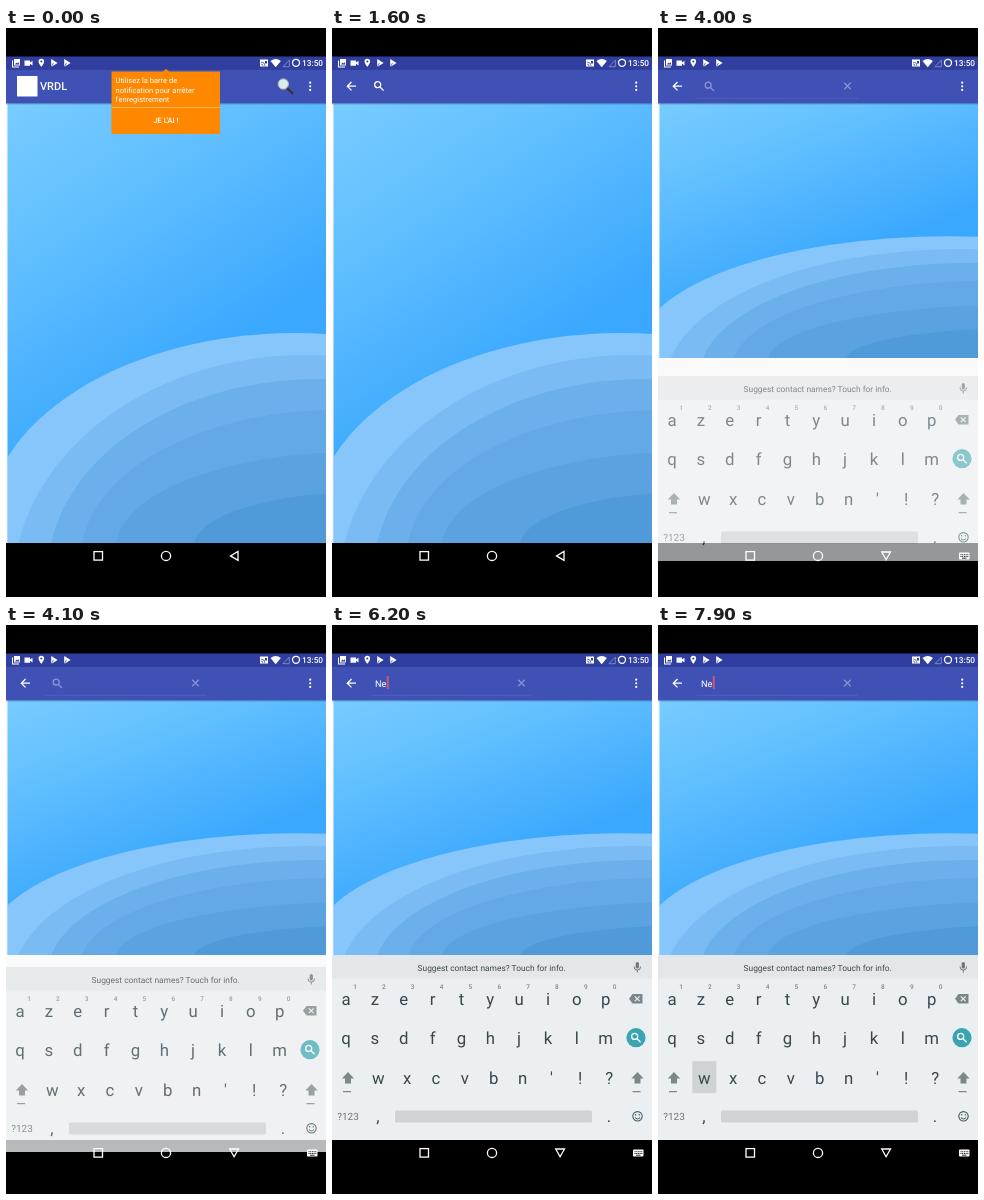
An HTML page for the animation above (8000 ms loop, 320 by 569 pixels).

```html
<!DOCTYPE html>
<html lang="fr">
<head>
<meta charset="utf-8">
<title>Recherche</title>
<style>
  html, body { margin: 0; width: 100%; height: 100%; overflow: hidden; background: #000; }
  svg { display: block; }
  #stage { width: 100%; height: 100%; font-family: Roboto, sans-serif; text-rendering: geometricPrecision; }
  .line { fill: none; stroke: #fff; stroke-width: 1.3; }
  .key { font-size: 16.8px; fill: #37474f; text-anchor: middle; }
  .num { font-size: 6.5px; font-weight: 500; fill: #7c878c; text-anchor: middle; }
</style>
</head>
<body>
<svg id="stage" viewBox="0 0 320 569">
  <defs>
    <linearGradient id="sky" gradientUnits="userSpaceOnUse" x1="0" y1="75" x2="181" y2="349">
      <stop offset="0" stop-color="#78ccff"/>
      <stop offset=".45" stop-color="#60beff"/>
      <stop offset="1" stop-color="#3aa8fe"/>
    </linearGradient>
    <linearGradient id="shade" x2="0" y2="1">
      <stop stop-color="#000" stop-opacity=".25"/>
      <stop offset="1" stop-color="#000" stop-opacity="0"/>
    </linearGradient>
    <g id="mag" fill="none" stroke-width="1.3">
      <circle cx="-1.3" cy="-1.3" r="3"/>
      <path d="M1 1L4.6 4.6"/>
    </g>
    <path id="shiftKey" d="M0-6L6.2 .5H3V5.5H-3V.5H-6.2Z"/>
    <g id="play"><path d="M-2.8-4L3.6 0L-2.8 4Z"/><path d="M-2.8 4L-.5 0" stroke="#303f9f" stroke-width=".7"/></g>
  </defs>

  <rect width="320" height="569"/>
  <rect y="75" width="320" height="440" fill="#fafafa"/>
  <svg id="wall" y="75" width="320" height="440" viewBox="0 75 320 440" preserveAspectRatio="none">
    <rect x="1.3" y="75" width="319" height="440" fill="url(#sky)"/>
    <g id="hills"></g>
    <rect y="75" width="1.3" height="440" fill="#f4f8fb"/>
  </svg>
  <rect y="75" width="320" height="2.5" fill="url(#shade)"/>

  <rect y="28.5" width="320" height="13" fill="#303f9f"/>
  <rect y="41.3" width="320" height="34" fill="#3f51b5"/>
  <g fill="#fff">
    <path d="M6 32.5h1v6h6v1H6ZM8 31h6v6.5H8Z"/>
    <path d="M9 36.5l1.5-2 1 1 1-1.3 1 2.3Z" fill="#303f9f"/>
    <path d="M18.5 32.5h5.5v2l2.500-1.7v4.6l-2.500-1.7v2h-5.5Z"/>
    <path d="M35.3 30.8a2.8 2.8 0 0 1 2.8 2.8c0 2-2.8 5.4-2.8 5.4s-2.8-3.400-2.8-5.400a2.8 2.8 0 0 1 2.8-2.8Z"/>
    <circle cx="35.3" cy="33.6" r="1" fill="#303f9f"/>
    <use href="#play" x="48" y="35"/>
    <use href="#play" x="61" y="35"/>
    <rect x="254" y="31.5" width="8" height="7"/>
    <path d="M255 36q2 0 2 2M255 34q4 0 4 4" stroke="#303f9f" stroke-width=".7" fill="none"/>
    <rect x="259" y="33" width="2" height="2.5" fill="#303f9f"/>
    <path d="M264.5 33q5.2-3.8 10.4 0l-5.2 6.3Z"/>
    <path d="M277 38.7h6.3v-6.6Z" fill="none" stroke="#8f98cf" stroke-width=".8"/>
    <circle cx="290" cy="34.8" r="3.5" class="line"/>
    <text x="296" y="38" font-size="8.3" font-weight="500">13:50</text>
    <circle cx="304.2" cy="54.7" r="1.1"/>
    <circle cx="304.2" cy="58.3" r="1.1"/>
    <circle cx="304.2" cy="61.9" r="1.1"/>
  </g>

  <g id="home">
    <rect x="11" y="48" width="20.5" height="20.5" fill="#fff"/>
    <text x="34" y="62.3" font-size="11" font-weight="500" fill="#fff">VRDL</text>
    <path d="M281 60L286.5 65.2" stroke="#37343a" stroke-width="2.4" stroke-linecap="round"/>
    <circle cx="277.3" cy="56" r="5.2" fill="#dcebe9" stroke="#a5b0ae"/>
  </g>
  <g id="search">
    <path class="line" d="M24 58.2H15.5M19.5 54L15.3 58.2L19.5 62.4"/>
    <use id="open" href="#mag" x="47" y="58" stroke="#fff"/>
    <g id="field">
      <path id="rule" d="M39 70.3H200" stroke="#fff"/>
      <use id="hint" href="#mag" x="51.5" y="58.5" stroke="#fff" opacity=".4"/>
      <path id="clear" class="line" d="M186.2 54.8l6.5 6.5m0-6.5l-6.5 6.5"/>
      <text id="query" x="43" y="61.5" font-size="9.2" fill="#fff"></text>
      <rect id="caret" y="51" width="2" height="13" fill="#c9567c"/>
    </g>
  </g>

  <g id="tip">
    <path d="M105.5 43.5H157L160 41L163 43.5H214V106H105.5Z" fill="#ff8800"/>
    <path d="M106 79.5H214" stroke="#ffc070" stroke-width=".8"/>
    <g fill="#fff" font-size="7.55">
      <text x="109.5" y="55.3">Utilisez la barre de</text>
      <text x="109.5" y="64.7">notification pour arrêter</text>
      <text x="109.5" y="74">l'enregistrement</text>
      <text x="160" y="95.3" font-weight="500" text-anchor="middle">JE L'AI !</text>
    </g>
  </g>

  <g id="board">
    <rect y="330" width="320" height="185" fill="#eceff1"/>
    <rect y="330" width="320" height="23.5" fill="#e4e7e9"/>
    <text x="159.7" y="346" font-size="8.4" fill="#37474f" text-anchor="middle">Suggest contact names? Touch for info.</text>
    <g fill="none" stroke="#6b777c">
      <path d="M305.3 338.5v3.5" stroke-width="3.2" stroke-linecap="round"/>
      <path d="M302 341.5a3.3 3.6 0 0 0 6.6 0M305.3 345v2.5"/>
    </g>
    <rect id="press" height="32" fill="#cfd3d6"/>
    <g id="keys"></g>
    <path d="M297 373.7l3.5-4.8h10v9.6h-10Z" fill="#7c878c"/>
    <path d="M302.8 371.3l4.8 4.8m0-4.8l-4.8 4.8" stroke="#eceff1" stroke-width="1.2"/>
    <g id="go">
      <circle cx="304" cy="412.7" r="9.6" fill="#3aa5b0"/>
      <use href="#mag" x="304" y="412.7" stroke="#fff"/>
    </g>
    <g id="shifts">
      <use href="#shiftKey" x="16" y="453"/>
      <use href="#shiftKey" x="305.5" y="453"/>
    </g>
    <path d="M11 466.7h8M300.5 466.7h8" stroke="#7c878c" stroke-width="1.2"/>
    <text x="16" y="494.8" font-size="10" fill="#6b777c" text-anchor="middle">?123</text>
    <rect x="63" y="485.5" width="197" height="12" rx="1.5" fill="#cfd3d6"/>
    <g fill="none" stroke="#455a64" stroke-width="1.1">
      <circle cx="305.5" cy="491.3" r="4.7"/>
      <path d="M303 492.5q2.5 3 5 0M303.7 489v1.5M307.3 489v1.5"/>
    </g>
  </g>

  <g class="line">
    <rect x="88" y="523.6" width="8.5" height="8.5"/>
    <circle cx="160" cy="527.9" r="4.6"/>
    <path id="back"/>
  </g>
  <g id="switcher">
    <rect x="301" y="524.5" width="10.5" height="7" rx=".8" fill="#fff"/>
    <path d="M302.5 526.7h8M302.5 528.5h8" stroke="#000" stroke-width=".9" stroke-dasharray="1 .7"/>
    <path d="M304 530.2h4.5" stroke="#000" stroke-width=".8"/>
  </g>
</svg>

<script>
const $ = id => document.getElementById(id);
const show = (id, on) => $(id).style.display = on ? '' : 'none';
const opacity = (id, v) => $(id).setAttribute('opacity', v);

function add(parent, tag, attrs, text = '') {
  const el = document.createElementNS('http://www.w3.org/2000/svg', tag);
  for (const name in attrs) el.setAttribute(name, attrs[name]);
  el.textContent = text;
  $(parent).append(el);
}

// Hills: centre x, centre y, radii, colour
[
  [290, 501, 310, 196, '#86c6fb'],
  [300, 560, 293, 233, '#7abbf4'],
  [312, 545, 270, 194, '#6bb0eb'],
  [330, 530, 255, 148, '#62a9e5'],
  [350, 520, 240, 96, '#5aa2e0'],
  [360, 518, 172, 54, '#519ad9']
].forEach(([cx, cy, rx, ry, fill]) => add('hills', 'ellipse', { cx, cy, rx, ry, fill }));

const PITCH = 28.85, keyAt = {};
[['azertyuiop', 14, 380], ['qsdfghjklm', 14, 419.2], ["wxcvbn'!?", 46.3, 458.5]].forEach(([row, left, y]) =>
  [...row].forEach((ch, i) => {
    const x = left + i * PITCH;
    keyAt[ch] = [x - 12, y - 22.3, 24];
    add('keys', 'text', { class: 'key', x, y }, ch);
  }));
keyAt.del = [290, 358, 28];
const letters = [...$('keys').children].map(el => [el, el.textContent]);
[...'1234567890'].forEach((n, i) => add('keys', 'text', { class: 'num', x: 23 + i * PITCH, y: 364 }, n));
add('keys', 'text', { class: 'key', x: 46, y: 497 }, ',');
add('keys', 'text', { class: 'key', x: 277, y: 497 }, '.');

// Each entry: start time, value
const presses = [[0, ''], [5200, 'n'], [5300, ''], [6000, 'e'], [6200, ''], [6400, 'x'], [6500, ''],
  [7400, 'del'], [7500, ''], [7900, 'w']];
const typed = [[0, ''], [5300, 'N'], [6100, 'Ne'], [6500, 'Nex'], [7400, 'Ne']];
const blinks = [[0, 1], [4000, 0], [4500, 1], [5000, 0], [5300, 1], [5800, 0], [6100, 1], [6900, 0], [7400, 1]];
const at = (track, t) => track.findLast(([start]) => start <= t)[1];
const clamp = v => Math.min(1, Math.max(0, v));

function draw(t) {
  opacity('tip', clamp((700 - t) / 600));
  show('home', t < 1600);
  show('search', t >= 1600);
  show('open', t < 3500);
  show('field', t >= 3500);
  opacity('rule', t < 3700 ? .35 : .07);
  opacity('clear', t < 3700 ? .5 : .38);

  const text = at(typed, t);
  show('hint', !text);
  $('query').textContent = text;
  $('caret').setAttribute('x', text ? 43.3 + $('query').getComputedTextLength() : 42.5);
  show('caret', at(blinks, t));

  const rise = clamp((t - 3800) / 500), up = rise > 0;
  $('wall').setAttribute('height', up ? 255 : 440);
  $('board').setAttribute('transform', `translate(0 ${30 * (1 - rise)})`);
  opacity('board', Math.sqrt(rise));
  opacity('go', t < 4500 ? .9 : 1);
  show('switcher', up);
  $('back').setAttribute('d', up ? 'M223.7 524H232.5L228.1 531.8Z' : 'M232 523.5V532.3L224.5 527.9Z');

  const caps = t >= 4700 && t < 5400;
  for (const [el, ch] of letters) el.textContent = !caps ? ch : ch === "'" ? '?' : ch.toUpperCase();
  $('shifts').setAttribute('fill', caps ? '#3aa5b0' : '#7c878c');

  const key = keyAt[at(presses, t)];
  show('press', key);
  if (key) ['x', 'y', 'width'].forEach((name, i) => $('press').setAttribute(name, key[i]));
}

function loop() {
  draw(Math.floor(performance.now() % 8000 / 100) * 100);
  requestAnimationFrame(loop);
}
loop();
</script>
</body>
</html>
```
